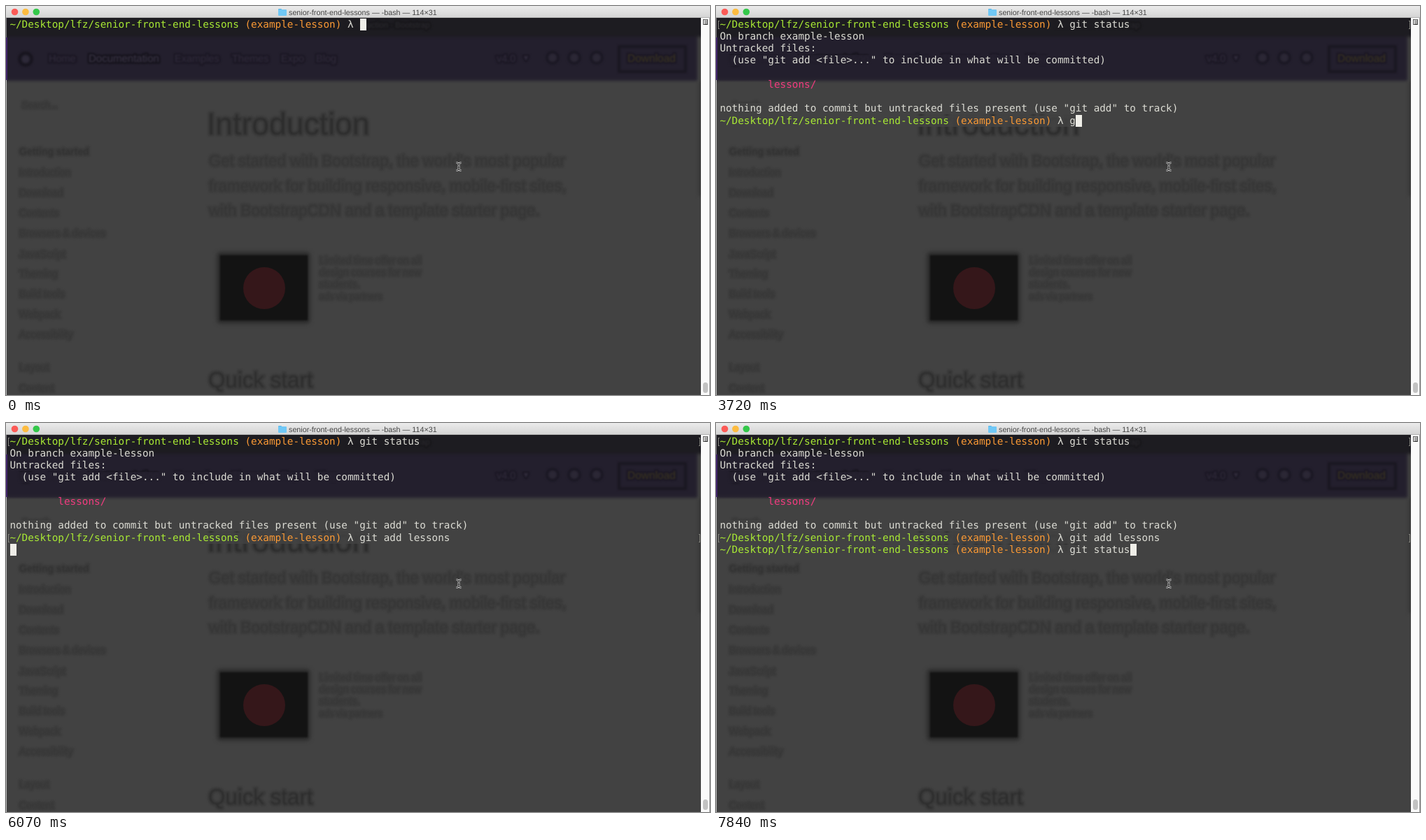
Recreate the animation shown at these times as an HTML page with a canvas. Size 1006 px wide and 557 px high, loop 8000 ms.

```html
<!DOCTYPE html>
<html lang="en">
<head>
<meta charset="utf-8">
<title>Terminal</title>
<style>
  html, body { margin: 0; width: 100%; height: 100%; overflow: hidden; background: #424242; }
  #stage { position: relative; width: 1006px; height: 557px; overflow: hidden; }
  #stage > * { position: absolute; }
  canvas { left: 0; top: 0; }
  #screen {
    left: 5.4px; top: 18.6px; margin: 0; color: #dcdcd4;
    font: 14.327px/17.25px "DejaVu Sans Mono", monospace;
    text-rendering: geometricPrecision; font-variant-ligatures: none;
  }
  /* Printed cells hide most of the page behind the window. */
  #screen .line {
    background: linear-gradient(#1d1c21cc 43px, #231f2dcc 46px 105px, #424242cc 109px) fixed;
  }
  #screen .path { color: #a9ea34; }
  #screen .branch { color: #fb9a35; }
  #screen .new { color: #f43b80; }
  #cursor { width: 9px; height: 16.5px; background: #efeee8; }
  .mark { left: 3px; width: 986px; height: 12px; }
  .mark::before, .mark::after {
    content: ""; position: absolute; top: 0; width: 1px; height: 10px;
    border: 1px solid #85857f;
  }
  .mark::before { left: 0; border-right: 0; }
  .mark::after { right: -3px; border-left: 0; }
</style>
</head>
<body>
<div id="stage">
  <canvas id="back" width="1006" height="557"></canvas>
  <pre id="screen"></pre>
  <div class="mark" style="top:21px"></div>
  <div class="mark" style="top:159px"></div>
  <div id="cursor"></div>
  <canvas id="chrome" width="1006" height="557"></canvas>
</div>
<script>
const LOOP = 8000, COL = 8.625, ROW = 17.25;
const $ = id => document.getElementById(id);
const SANS = '"Liberation Sans", Arial, sans-serif';
let g;

function rect(x, y, w, h, fill, radius = 0) {
  g.fillStyle = fill;
  g.beginPath();
  g.roundRect(x, y, w, h, radius);
  g.fill();
}

function dot(x, y, r, fill) {
  g.fillStyle = fill;
  g.beginPath();
  g.arc(x, y, r, 0, 7);
  g.fill();
}

// Blurred lettering seen through the window: a soft halo around a darker core.
function haze(text, x, y, size, { halo = '#3d3d3d', core = '#353535', bold = '' } = {}) {
  g.font = `${bold} ${size}px ${SANS}`;
  g.textRendering = 'geometricPrecision';
  g.lineJoin = 'round';
  g.lineWidth = 6;
  g.strokeStyle = halo;
  g.fillStyle = core;
  g.filter = 'blur(1.2px)';
  g.strokeText(text, x, y);
  g.fillText(text, x, y);
  g.filter = 'none';
}

function drawBack() {
  g = $('back').getContext('2d');
  rect(0, 0, 1006, 557, '#424242');
  g.filter = 'blur(2px)';
  rect(-9, 0, 997, 107, '#231f2d');
  rect(-9, 0, 1030, 44, '#1d1c21');
  rect(989, 108, 9, 164, '#393939');
  g.filter = 'none';

  haze('Introduction · Bootstrap', 486, 31, 11.5, { halo: '#19181c', core: '#2b2a2f' });

  const nav = { halo: '#1d1926', core: '#302b3b' };
  const items = [['Home', 61], ['Examples', 241], ['Themes', 323], ['Expo', 393], ['Blog', 443], ['v4.0', 701]];
  for (const [text, x] of items) haze(text, x, 80, 14.5, nav);
  haze('Documentation', 118, 80, 15, { halo: '#18151f', core: '#3b3647' });
  haze('▾', 740, 78, 12, nav);
  haze('Download', 888, 80, 15.5, { halo: '#1d1926', core: '#3a3420' });
  g.filter = 'blur(1.5px)';
  dot(28, 76, 11, '#18151f');
  dot(28, 76, 6, '#2d2938');
  for (const x of [781, 812, 844]) {
    dot(x, 74, 10, '#1b1824');
    dot(x, 74, 6, '#2b2735');
  }
  g.strokeStyle = '#1a1721';
  g.lineWidth = 4;
  g.strokeRect(876, 58, 95, 36);
  g.filter = 'none';

  const side = [
    ['Getting started', 208], ['Introduction', 238], ['Download', 267], ['Contents', 296],
    ['Browsers & devices', 325], ['JavaScript', 355], ['Theming', 383], ['Build tools', 412],
    ['Webpack', 441], ['Accessibility', 470], ['Layout', 517], ['Content', 547]
  ];
  haze('Search...', 23, 146, 12.5);
  side.forEach(([text, y], i) => haze(text, 19, y + 5, 14, i ? {} : { bold: 'bold', core: '#313131' }));

  const heading = { halo: '#3b3b3b', core: '#2d2d2d' };
  haze('Introduction', 287, 184, 44.5, heading);
  haze('Get started with Bootstrap, the world\'s most popular', 290, 229, 22.2);
  haze('framework for building responsive, mobile-first sites,', 290, 264.5, 22.2);
  haze('with BootstrapCDN and a template starter page.', 290, 299.5, 22.2);
  haze('Quick start', 289, 545.5, 31.3, heading);

  g.filter = 'blur(3px)';
  rect(302, 353, 132, 101, '#252525', 4);
  g.filter = 'blur(1px)';
  rect(306, 357, 125, 93, '#131313');
  g.filter = 'none';
  dot(369, 404, 30, '#35171a');

  const ad = ['Limited time offer on all', 'design courses for new', 'students.', 'ads via partners'];
  ad.forEach((text, i) => haze(text, 448, 369 + 17 * i, i < 3 ? 14.1 : 12.5));
}

function drawChrome() {
  g = $('chrome').getContext('2d');
  rect(0, 17, 1, 28, '#77757a');
  rect(0, 45, 2, 61, '#40246a');
  rect(0, 106, 1, 451, '#b8b8b8');

  const bar = g.createLinearGradient(0, 0, 0, 17);
  bar.addColorStop(0, '#ebebeb');
  bar.addColorStop(1, '#d3d3d3');
  rect(0, 0, 1006, 17, bar);
  rect(0, 16, 1006, 1, '#b4b4b4');
  ['#fc5b57', '#fdbc40', '#34c84a'].forEach((c, i) => dot(12.5 + 15.4 * i, 8.5, 4.8, c));
  rect(389, 4, 5, 4, '#55b5e8', 1);
  rect(389, 5, 12, 9, '#70c8f6', 1);
  g.fillStyle = '#444';
  g.font = `10.75px ${SANS}`;
  g.textRendering = 'geometricPrecision';
  g.fillText('senior-front-end-lessons — -bash — 114×31', 404, 13);

  rect(993, 17, 12, 540, '#fafafa');
  rect(1005, 17, 1, 540, '#999');
  rect(996, 539, 7, 15, '#c2c2c2', 3.5);
  g.strokeStyle = '#555';
  g.lineWidth = 1;
  g.strokeRect(996.5, 19.5, 6, 7);
  for (const y of [21, 23, 25]) rect(998, y, 4, 1, '#555');

  // Text pointer
  const beam = new Path2D('M643.5 224.5Q647 224.5 647 227V233Q647 235.5 643.5 235.5M650.5 224.5Q647 224.5 647 227M650.5 235.5Q647 235.5 647 233M645 231H649');
  for (const [color, width] of [['#d8d8d8', 2.6], ['#222', 1]]) {
    g.strokeStyle = color;
    g.lineWidth = width;
    g.stroke(beam);
  }
}

const PROMPT = '<span class="path">~/Desktop/lfz/senior-front-end-lessons</span> <span class="branch">(example-lesson)</span> λ ';
const PROMPT_COLS = 58;
const STATUS = [
  'On branch example-lesson',
  'Untracked files:',
  '  (use "git add &lt;file&gt;..." to include in what will be committed)',
  '',
  '        <span class="new">lessons/</span>',
  '',
  'nothing added to commit but untracked files present (use "git add" to track)'
];

// keys: the time at which each character appears
const commands = [
  { text: 'git status', start: 0, enter: 2640, output: STATUS,
    keys: [1430, 1580, 1700, 1700, 1940, 1940, 2180, 2180, 2410, 2520] },
  { text: 'git add lessons', start: 2760, enter: 6070, output: [],
    keys: [3720, 3830, 3950, 3950, 4190, 4420, 4540, 4660, 4890, 5010, 5250, 5370, 5480, 5600, 5720] },
  { text: 'git status', start: 6180, enter: Infinity, output: [],
    keys: [6780, 6900, 7010, 7130, 7260, 7370, 7480, 7600, 7720, 7840] }
];
const marks = document.querySelectorAll('.mark');
let shown;

function render(t) {
  const lines = [];
  let col = 0, row = 0;
  commands.forEach((cmd, i) => {
    const entered = t >= cmd.enter;
    if (marks[i]) marks[i].hidden = !entered;
    if (t < cmd.start) return;
    const typed = cmd.keys.filter(k => k <= t).length;
    if (i) lines.push(...commands[i - 1].output);
    lines.push(PROMPT + cmd.text.slice(0, typed));
    row = lines.length - 1 + entered;
    col = entered ? 0 : PROMPT_COLS + typed;
  });

  const html = lines.map(line => `<span class="line">${line}</span>`).join('\n');
  if (html !== shown) $('screen').innerHTML = shown = html;
  $('cursor').style.left = 5.5 + col * COL + 'px';
  $('cursor').style.top = 18 + row * ROW + 'px';
}

drawBack();
drawChrome();
const begin = performance.now();
(function tick() {
  render((performance.now() - begin) % LOOP);
  requestAnimationFrame(tick);
})();
</script>
</body>
</html>
```
